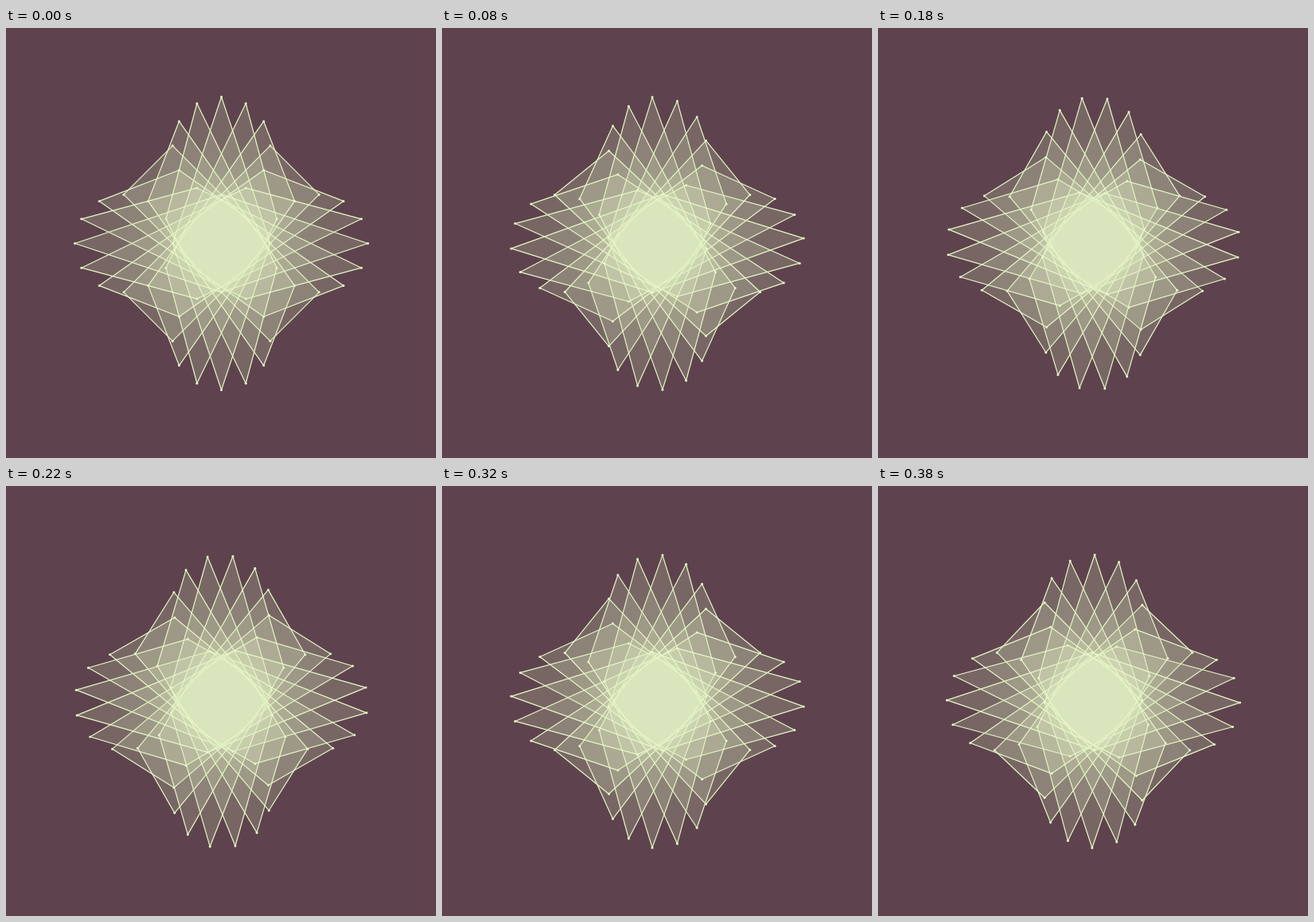
Write an HTML page with a canvas that moves like this. It is 540x540 px and loops after 400 ms.

```html
<!DOCTYPE html>
<html lang="en">
<head>
<meta charset="utf-8">
<title>Rotating rhombi</title>
<style>
  html, body { margin: 0; width: 100%; height: 100%; overflow: hidden; background: #5e434e; }
  canvas { display: block; width: 540px; height: 540px; }
</style>
</head>
<body>
<canvas id="stage" width="540" height="540"></canvas>
<script>
const ctx = document.getElementById('stage').getContext('2d');
const SIZE = 540, CENTER = 270.5;
const ORBIT = 61.33, DISTANCE = ORBIT * 2;
const COUNT = 12, LOOP = 400, STEP = 20;
const TAU = Math.PI * 2;
const BACKGROUND = '#5e434e', LINE = '#e6f7c6', FILL = 'rgba(225, 241, 196, 0.2)';

// One corner per orbit (top, right, bottom, left), each a quarter turn behind the last.
function corners(phase) {
  return [0, 1, 2, 3].map(side => {
    const place = (side - 1) * TAU / 4;
    const angle = phase - side * TAU / 4;
    return [
      CENTER + DISTANCE * Math.cos(place) + ORBIT * Math.cos(angle),
      CENTER + DISTANCE * Math.sin(place) + ORBIT * Math.sin(angle)
    ];
  });
}

function drawRhombus(points) {
  ctx.beginPath();
  points.forEach(([x, y]) => ctx.lineTo(x, y));
  ctx.closePath();
  ctx.fill();
  ctx.stroke();
}

function drawDot([x, y]) {
  ctx.beginPath();
  ctx.arc(x, y, 1.5, 0, TAU);
  ctx.fill();
}

function draw(time) {
  const progress = Math.floor((time % LOOP) / STEP) * STEP / LOOP;
  const shapes = Array.from({ length: COUNT }, (_, i) =>
    corners((i - progress) * TAU / COUNT - TAU / 4));

  ctx.fillStyle = BACKGROUND;
  ctx.fillRect(0, 0, SIZE, SIZE);
  ctx.lineWidth = 1.2;
  ctx.lineJoin = 'round';
  ctx.strokeStyle = LINE;
  ctx.fillStyle = FILL;
  shapes.forEach(drawRhombus);
  ctx.fillStyle = LINE;
  shapes.flat().forEach(drawDot);
}

function tick() {
  draw(performance.now());
  requestAnimationFrame(tick);
}
tick();
</script>
</body>
</html>
```
